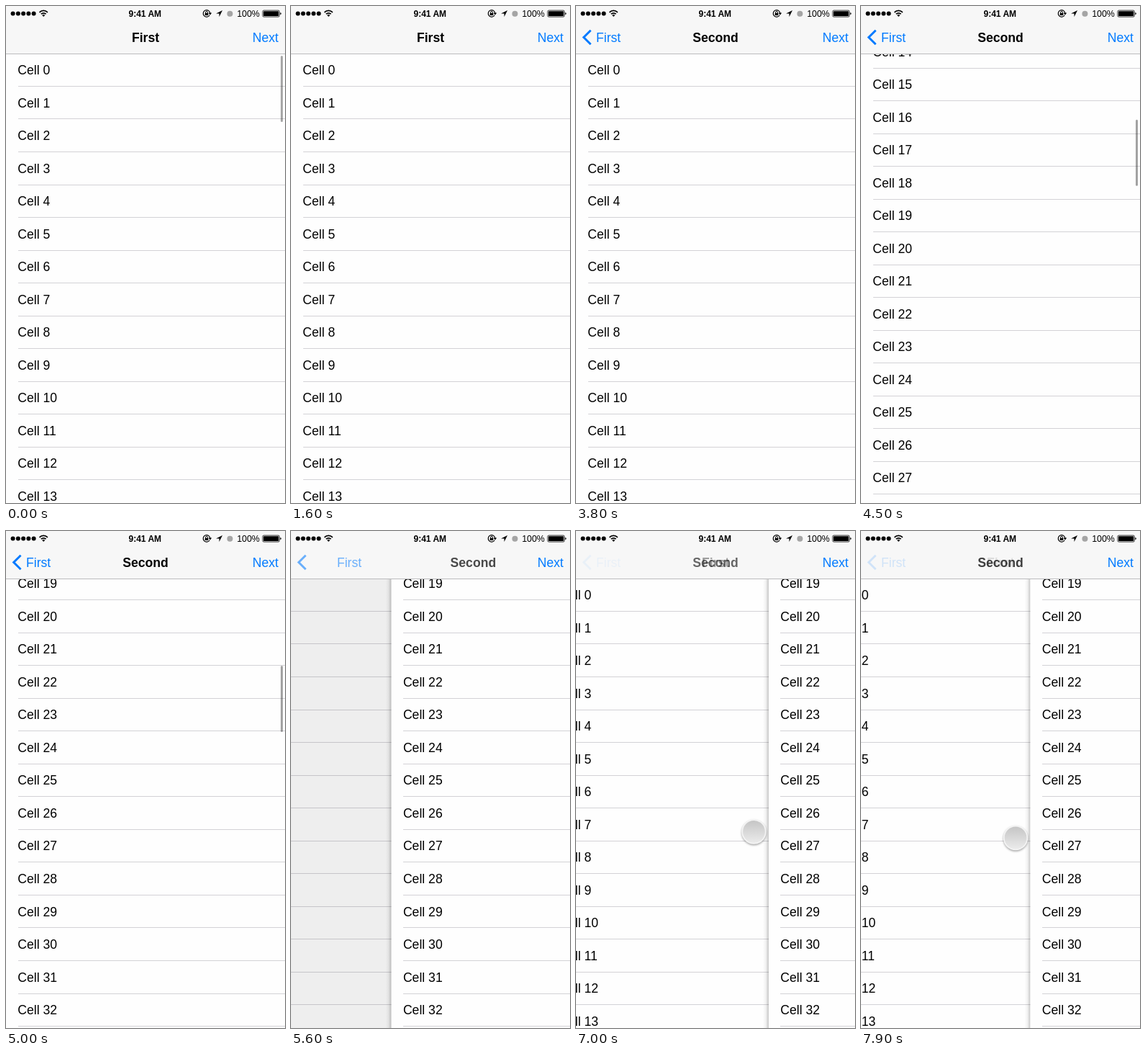
An HTML page for the animation above (8000 ms loop, 388x690 px).

```html
<!DOCTYPE html>
<html lang="en">
<head>
<meta charset="utf-8">
<title>Navigation with swipe</title>
<style>
html, body { margin: 0; width: 100%; height: 100%; overflow: hidden; background: #fff; }
svg { display: block; width: 388px; height: 690px; font: 17.6px "Liberation Sans", Arial, sans-serif; }
.title { font-weight: bold; text-anchor: middle; }
.link { fill: #007aff; }
.line { shape-rendering: crispEdges; }
</style>
</head>
<body>
<svg viewBox="0 0 388 690" xmlns="http://www.w3.org/2000/svg">
  <defs>
    <linearGradient id="edge">
      <stop offset="0" stop-opacity="0"/>
      <stop offset=".5" stop-opacity=".05"/>
      <stop offset="1" stop-opacity=".22"/>
    </linearGradient>
    <linearGradient id="knob" x2="0" y2="1">
      <stop offset="0" stop-color="#c4c4c4"/>
      <stop offset="1" stop-color="#ececec"/>
    </linearGradient>
    <filter id="soft" x="-50%" y="-50%" width="200%" height="200%">
      <feGaussianBlur stdDeviation="1.6"/>
    </filter>
  </defs>

  <g id="firstPage">
    <rect width="388" height="690" fill="#fefefe"/>
    <g id="firstRows"></g>
    <rect id="firstBar" x="382" y="69" width="3" height="92" rx="1.5" fill="#000"/>
    <rect id="dim" width="400" height="690"/>
  </g>
  <g id="secondPage">
    <rect id="shadow" x="-8" y="66" width="8" height="624" fill="url(#edge)"/>
    <rect width="388" height="690" fill="#fefefe"/>
    <g id="secondRows"></g>
    <rect id="secondBar" x="382" width="3" height="92" rx="1.5" fill="#000"/>
  </g>

  <rect width="388" height="66" fill="#f7f7f7"/>
  <rect class="line" y="66" width="388" height="1" fill="#bcbcbe"/>
  <g id="back" class="link">
    <path d="M20.5 33.8 10.7 43.5 20.5 53.2" fill="none" stroke="#007aff" stroke-width="3"/>
    <text id="backLabel" x="28" y="49.5">First</text>
  </g>
  <text id="firstTitle" class="title" y="49.5">First</text>
  <text id="secondTitle" class="title" y="49.5">Second</text>
  <text class="link" x="379" y="49.5" text-anchor="end">Next</text>

  <g id="status">
    <g id="signal"></g>
    <g fill="none" stroke="#000" stroke-width="1.7">
      <path d="M46.5 8.8a8 8 0 0 1 11.4 0M48.8 11.2a4.8 4.8 0 0 1 6.8 0"/>
    </g>
    <path d="M50.2 12.8a2.8 2.8 0 0 1 4 0l-2 2.2z"/>
    <text x="193.3" y="15" font-size="12" font-weight="bold" text-anchor="middle">9:41 AM</text>
    <path d="M283.2 12.8a4.8 4.8 0 1 1 .6-3" fill="none" stroke="#000" stroke-width="1.2"/>
    <path d="M281.6 9.4h4.6l-2.3 3zM276.7 9.8h4.6v3.2h-4.6z"/>
    <path d="M277.6 10V8.7a1.4 1.4 0 0 1 2.8 0V10" fill="none" stroke="#000"/>
    <path d="M301 6 292 10.4h4.5V15z"/>
    <circle cx="311.4" cy="10.7" r="4" fill="#a5a5a5"/>
    <text x="321.2" y="15" font-size="12.4">100%</text>
    <rect x="356.9" y="6.1" width="23.4" height="9" rx="1.6" fill="none" stroke="#000" stroke-width=".8"/>
    <rect x="358" y="7.2" width="21.2" height="6.8" rx=".6"/>
    <path d="M381.4 9v3.2q1.4-.3 1.4-1.6t-1.4-1.6z"/>
  </g>

  <g id="touch">
    <circle cy="1.5" r="17" opacity=".4" filter="url(#soft)"/>
    <circle r="16.3" fill="url(#knob)" stroke="#f4f4f4" stroke-width="1.8"/>
  </g>
</svg>
<script>
const LOOP = 8000, WIDTH = 388, ROW = 45.525, TOP = 66.2, ROWS = 36;
const SCROLL_END = 880.7;
const PUSH = 3058, POP = 5500, SWIPE = 6450;

const ui = {};
document.querySelectorAll('[id]').forEach(el => ui[el.id] = el);

const clamp = v => Math.max(0, Math.min(1, v));
const ramp = (t, from, to) => clamp((t - from) / (to - from));
const mix = (a, b, k) => a + (b - a) * k;
const easeOut = k => 1 - (1 - k) ** 3;
const move = (el, x, y = 0) => el.setAttribute('transform', `translate(${x} ${y})`);
const fade = (el, opacity) => el.setAttribute('opacity', clamp(opacity));

function add(parent, tag, attrs, text = '') {
  const el = document.createElementNS('http://www.w3.org/2000/svg', tag);
  for (const name in attrs) el.setAttribute(name, attrs[name]);
  el.textContent = text;
  parent.append(el);
}

for (const rows of [ui.firstRows, ui.secondRows]) {
  for (let i = 0; i < ROWS; i++) {
    const y = TOP + i * ROW;
    add(rows, 'text', { x: 16.3, y: y + 28.8 }, `Cell ${i}`);
    add(rows, 'rect', { class: 'line', x: 16.5, y: y + ROW - 0.8, width: 371.5, height: 1, fill: '#d3d2d6' });
  }
}
for (let i = 0; i < 5; i++) add(ui.signal, 'circle', { cx: 9.6 + i * 7.25, cy: 10.6, r: 3 });

// Critically damped spring from 0 to 1, settled after 700 ms.
function spring(ms) {
  if (ms <= 0) return 0;
  if (ms >= 700) return 1;
  const k = ms * 0.0125;
  return 1 - (1 + k) * Math.exp(-k);
}

function swipeAt(t) {
  const start = ramp(t, SWIPE, 7000), drag = ramp(t, 7000, 7900);
  return {
    x: mix(mix(372, 247.5, easeOut(start)), 215, drag),
    y: mix(mix(412, 417.5, start), 426, drag)
  };
}

function scrollAt(t) {
  const k = ramp(t, 3950, 4960);
  return SCROLL_END * (1 - (1 - k) ** 3 * (1 + 3 * k));
}

function drawBar(p, swiping) {
  if (swiping) {
    fade(ui.firstTitle, (0.43 - p) * 3);
    fade(ui.secondTitle, p * 1.9);
    fade(ui.back, (p - 0.27) * 1.25);
  } else {
    fade(ui.firstTitle, 1 - 3 * p);
    fade(ui.secondTitle, (p - 0.15) / 0.7);
    fade(ui.back, (p - 0.3) / 0.6);
  }
  ui.firstTitle.setAttribute('x', 194 - (swiping ? 0 : 110 * p));
  ui.secondTitle.setAttribute('x', 194 + (swiping ? 0 : 165 * (1 - p)));
  ui.backLabel.setAttribute('x', 28 + (swiping ? 0 : 100 * (1 - p)));
}

function drawTouch(t, swiping, swipe) {
  const flick = ramp(t, 3900, 4250);
  if (swiping) {
    move(ui.touch, swipe.x, swipe.y);
    fade(ui.touch, ramp(t, SWIPE, SWIPE + 80));
  } else {
    move(ui.touch, mix(243, 250, flick), mix(487, 370, flick ** 1.5));
    fade(ui.touch, ramp(t, 3880, 3950) - ramp(t, 4200, 4280));
  }
}

function render(t) {
  const swiping = t >= SWIPE;
  const swipe = swipeAt(t);
  const p = swiping
    ? clamp((WIDTH - swipe.x - 20.5) / WIDTH)
    : spring(t - PUSH) - spring(t - POP);
  const scroll = scrollAt(t);

  move(ui.firstPage, -WIDTH * p / 3);
  move(ui.secondPage, WIDTH * (1 - p));
  move(ui.secondRows, 0, -scroll);
  fade(ui.shadow, p > 0 && p < 1 ? 1 : 0);
  fade(ui.dim, swiping ? 0 : 0.1 * p);

  const flash = ramp(t, 6080, 6180) - ramp(t, 6180, 6450) * 0.9;
  fade(ui.firstBar, t < 3000 ? 0.34 * (1 - ramp(t, 450, 800)) : t < 6450 ? 0.24 * flash : 0);
  ui.secondBar.setAttribute('y', 69 + scroll * 0.134);
  fade(ui.secondBar, 0.36 * (ramp(t, 3950, 4050) - ramp(t, 5100, 5400)));

  drawBar(p, swiping);
  drawTouch(t, swiping, swipe);
}

const startTime = performance.now();
function tick() {
  render((performance.now() - startTime) % LOOP);
  requestAnimationFrame(tick);
}
tick();
</script>
</body>
</html>
```
